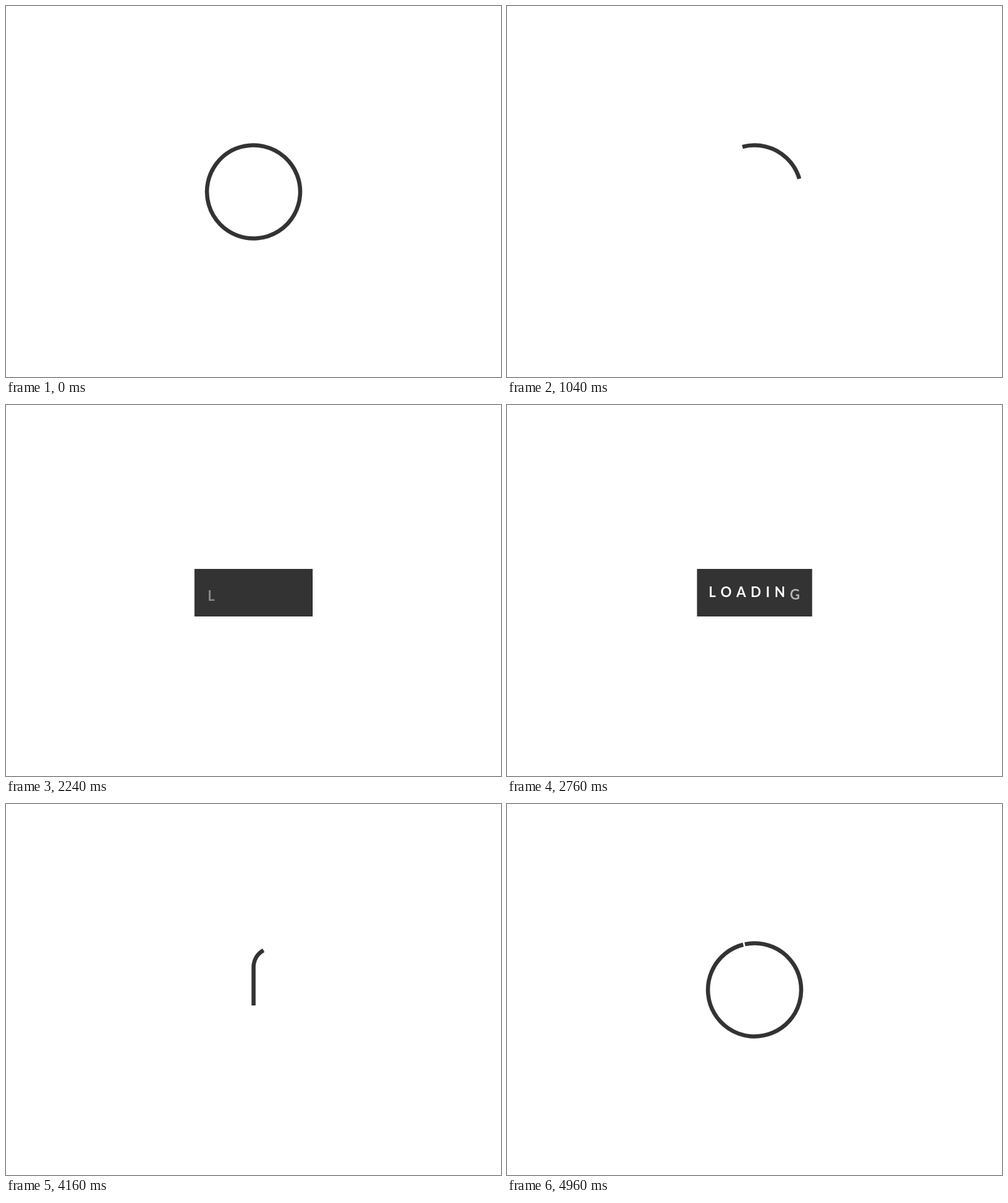
These frames come from a looping animation (791 by 593 pixels, 5 s). An HTML page:

```html
<!DOCTYPE html>
<html lang="en">
<head>
<meta charset="utf-8">
<title>Loading</title>
<style>
  html, body { margin: 0; width: 100%; height: 100%; overflow: hidden; background: #fff; }
  svg { display: block; width: 791px; height: 593px; }
  path { fill: none; stroke: #333; stroke-width: 6.5; }
  rect { fill: #333; }
  text { font: 700 22px Lato, sans-serif; letter-spacing: 7.5px; font-kerning: none; fill: #fff; }
</style>
</head>
<body>
<svg viewBox="0 0 791 593">
  <path id="stroke"/>
  <rect id="box" y="262" height="76"/>
  <text id="label" x="322.3" y="307"></text>
</svg>
<script>
const LOOP = 5000, STEP = 40;
const CX = 395.6, CY = 297, R = 74.5;
const PX = R * Math.PI / 180;            // pixels per degree on the ring
const RING = 360 * PX;
const SEAM = -12.5;                      // clock angle where the ring closes
const BEND = 30, BEND_X = CX + BEND, BEND_DY = 36.6;

const stroke = document.getElementById('stroke');
const box = document.getElementById('box');
const label = document.getElementById('label');

const letters = [...'LOADING'].map(ch => {
  const span = document.createElementNS('http://www.w3.org/2000/svg', 'tspan');
  span.textContent = ch;
  return label.appendChild(span);
});

const clamp = v => Math.min(1, Math.max(0, v));

// Point on the ring at a clock angle in degrees.
function ringPoint(deg) {
  const a = deg * Math.PI / 180;
  return [CX + R * Math.sin(a), CY - R * Math.cos(a)];
}

// Clockwise arcs between two unwrapped clock angles.
function ringArc(from, to) {
  const n = Math.ceil((to - from) / 120);
  let d = '';
  for (let i = 1; i <= n; i++) {
    d += `A${R} ${R} 0 0 1 ${ringPoint(from + (to - from) * i / n)}`;
  }
  return d;
}

// Two rounds of the ring, then inwards and up the middle.
function inwardPath() {
  const [x, y] = ringPoint(120), low = CY + BEND_DY + BEND;
  return `M${ringPoint(SEAM)}${ringArc(SEAM, 840)}` +
    `C${x - 9.5} ${y + 16.5} ${BEND_X + 9.6} ${low} ${BEND_X} ${low}` +
    `A${BEND} ${BEND} 0 0 1 ${CX} ${low - BEND}V262`;
}

// Up the middle, out to the ring and around.
function outwardPath() {
  const [x, y] = ringPoint(60), high = CY - BEND_DY - BEND;
  return `M${CX} 338V${high + BEND}` +
    `A${BEND} ${BEND} 0 0 1 ${BEND_X} ${high}` +
    `C${BEND_X + 9.6} ${high} ${x - 9.5} ${y - 16.5} ${x} ${y}` +
    ringArc(60, SEAM + 720);
}

// Smooth monotone curve through [time, value] knots.
function curve(knots) {
  const last = knots.length - 1;
  const slope = i => (knots[i + 1][1] - knots[i][1]) / (knots[i + 1][0] - knots[i][0]);
  const tangent = i => {
    if (i === 0 || i === last) return 0;
    const a = slope(i - 1), b = slope(i);
    return a * b > 0 ? 2 * a * b / (a + b) : 0;
  };
  return t => {
    if (t <= knots[0][0]) return knots[0][1];
    if (t >= knots[last][0]) return knots[last][1];
    const i = knots.findIndex(k => k[0] > t) - 1;
    const [t0, v0] = knots[i], [t1, v1] = knots[i + 1];
    const h = t1 - t0, u = (t - t0) / h, w = 1 - u;
    return v0 * (1 + 2 * u) * w * w + v1 * u * u * (3 - 2 * u) +
      h * u * w * (tangent(i) * w - tangent(i + 1) * u);
  };
}

function measure(d) {
  stroke.setAttribute('d', d);
  return stroke.getTotalLength();
}

const inD = inwardPath(), inEnd = measure(inD);
const outD = outwardPath(), outEnd = measure(outD);

const inTail = curve([[90, 0], [680, 432.5 * PX], [1200, 808 * PX], [1560, inEnd - 88.2], [1760, inEnd - 76]]);
const inHead = curve([[90, RING], [680, 538 * PX], [1200, inEnd - 108], [1560, inEnd - 8], [1760, inEnd]]);
const outTail = curve([[3950, 0], [4160, 16], [4240, 40], [4800, outEnd - RING - 2], [4960, outEnd - RING]]);
const outHead = curve([[3950, 76], [4160, 110], [4240, 160], [4800, outEnd - 68], [4960, outEnd - 3.5], [5000, outEnd]]);
const boxWidth = curve([[1770, 6.5], [2000, 110], [2230, 189], [2320, 184], [3690, 184], [3720, 183], [3830, 95], [3950, 6.5]]);

function drawStroke(d, tail, head) {
  stroke.setAttribute('d', d);
  stroke.setAttribute('stroke-dasharray', `0 ${tail} ${head - tail} 9999`);
}

function drawLabel(t) {
  const fade = 1 - clamp((t - 3680) / 155);
  let prev = 0;
  letters.forEach((span, i) => {
    const shown = clamp((t - 2160 - i * 80) / 190);
    const drop = 10 * (1 - shown);
    span.setAttribute('dy', drop - prev);
    span.setAttribute('fill-opacity', shown * fade);
    prev = drop;
  });
}

function draw(t) {
  const boxed = t > 1770 && t < 3950;
  stroke.style.display = boxed ? 'none' : '';
  box.style.display = label.style.display = boxed ? '' : 'none';
  if (boxed) {
    const w = boxWidth(t);
    box.setAttribute('x', CX - w / 2);
    box.setAttribute('width', w);
    drawLabel(t);
  } else if (t < 2000) {
    // A slight overlap hides the seam while the ring is whole.
    drawStroke(inD, inTail(t), inHead(t) + (t < 120 ? 1 : 0));
  } else {
    drawStroke(outD, outTail(t), outHead(t));
  }
}

function tick() {
  const t = performance.now() % LOOP;
  draw(Math.floor(t / STEP) * STEP);
  requestAnimationFrame(tick);
}
tick();
</script>
</body>
</html>
```
